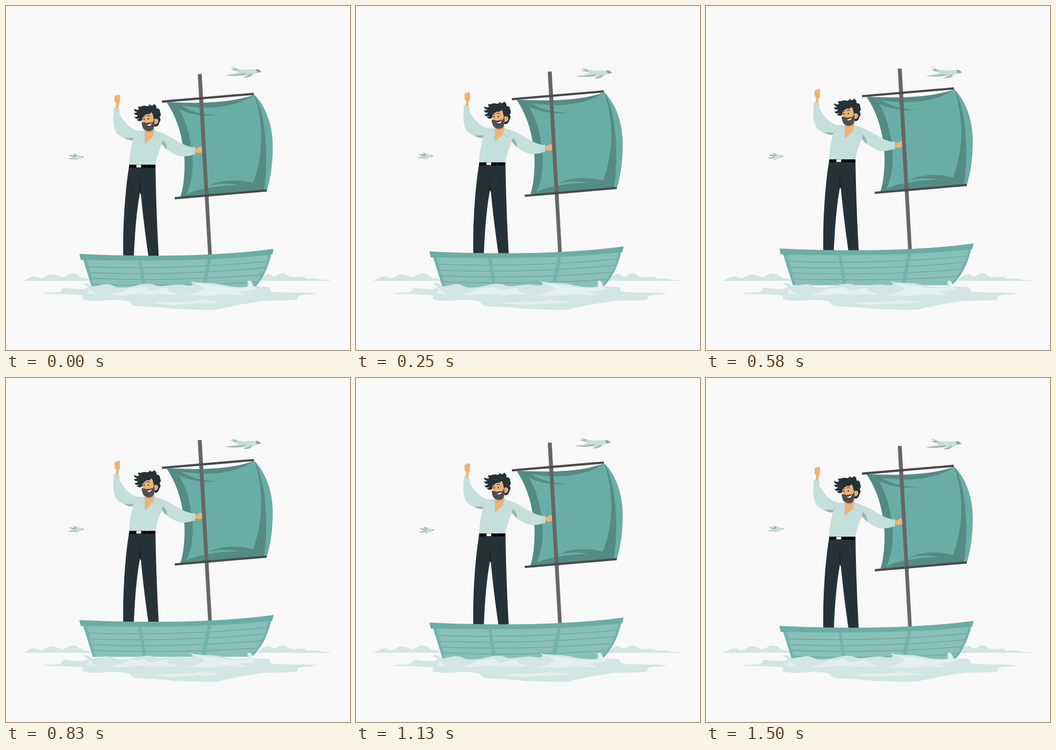
An HTML page that plays this animation: 748x748 px, repeating every 1540 ms.

```html
<!DOCTYPE html>
<html lang="en">
<head>
<meta charset="utf-8">
<title>Sailing</title>
<style>
html, body { margin: 0; width: 100%; height: 100%; overflow: hidden; background: #f8f8f8; }
svg { display: block; width: 100%; height: 100%; }
.teal { fill: #6aada7; }
.deep { fill: #558b85; }
.hull { fill: #88bfb9; }
.rib { fill: #74b3ac; }
.sea { fill: #d2e6e3; }
.foam { fill: #e4f0ee; }
.cloth { fill: #c5dfdb; }
.shade { fill: #9db3b0; }
.skin { fill: #efb274; }
.ink { fill: #263238; }
.plank { fill: none; stroke: #6a9f99; stroke-width: 1.3; }
.seam { fill: none; stroke: #a9c9c5; stroke-width: .7; }
.yard { stroke: #4a4a4a; stroke-width: 4.8; }
.tie { fill: none; stroke: #263238; stroke-width: 1.2; }
</style>
</head>
<body>
<svg viewBox="0 0 748 748">
  <rect width="748" height="748" fill="#f8f8f8"/>

  <!-- far waves -->
  <g class="sea" stroke="#bfdad6" stroke-width=".5">
    <path d="M38 597C45 596 50 590 58 589C70 588 70 593 78 592C88 590 90 584 100 584C110 584 115 589 122 590C130 590 135 582 145 582C158 582 160 592 170 592C175 592 180 595 186 597Z"/>
    <path d="M545 597C555 592 562 582 572 583C580 590 585 590 592 585C600 580 606 581 612 586C620 592 625 590 634 590C645 588 650 590 655 594C665 593 672 592 680 594C690 597 700 596 706 597Z"/>
  </g>

  <!-- birds -->
  <g id="bird">
    <path class="shade" d="M488 131.500L507 137.500L524 140L514 144L500 141L487 137L498 137Z"/>
    <path class="cloth" d="M498 137L512 138L526 139L516 143L504 141Z"/>
    <path class="cloth" d="M514 140.500C525 136 538 139 545 137.500C551 137 552 141 556 143C550 145 545 146 541 147C536 153 526 156 516 155C521 153 519 151 520 149C505 151 490 154 478 150C492 147.500 500 147 514 140.500Z"/>
    <path class="shade" d="M478 150C492 150 506 149 520 146L519 150C505 152 490 153 478 150ZM516 155C525 153 530 149 535 146L533 152C528 155 522 156 516 155Z"/>
    <path fill="#86aaa6" d="M543 138C551 136 552 141 556 143L546 145Z"/>
  </g>
  <g id="chick">
    <path class="shade" d="M146 321L157 324L160 328L150 328ZM136 324L147 325L153 329L143 328Z"/>
    <path class="cloth" d="M151 323L160 325L162 328L154 328ZM134 331C143 331 148 328 155 327C160 325 164 325 166 327L170 328C166 330 163 331 160 332C157 335 152 336 147 335L150 332C144 334 138 334 134 331Z"/>
    <path class="shade" d="M134 331C141 332 146 331 151 330L150 332C144 334 138 333 134 331ZM164 326L170 328L165 330Z"/>
  </g>

  <g id="boat">
    <!-- sail -->
    <path class="teal" d="M349 209C395 211 480 215 540 193C563 215 580 257 580 305C580 345 575 375 567 402L379 416C386 396 388.500 368 388.500 340C386 287 372 242 349 209Z"/>
    <path class="deep" d="M349 209C395 211 480 215 540 193C515 210 480 221 430 221C395 220 370 215 352 209Z"/>
    <path class="deep" d="M352 209C384 234 420 241 464 237C425 237 400 229 376 213Z"/>
    <path class="deep" d="M349 209C372 242 386 287 388.500 340C388.500 368 386 396 379 416L390 415C402 392 407 362 406 335C403 290 393 248 372 218Z"/>
    <path class="deep" d="M540 193C566 235 571 330 561 402L384 414C400 404 420 398 440 396C465 391 490 389 508 390C480 384 455 387 440 391C470 376 510 377 537 385C560 325 561 255 540 193Z"/>
    <path class="yard" d="M339 208L539 191M367 418L567 401"/>

    <!-- outstretched arm -->
    <path class="skin" d="M409 310L417 309L420 306L428 306L428 318L419 320L409 318Z"/>
    <path fill="#666" d="M417 148L425.500 147.500L447.500 541L439.500 541Z"/>
    <path class="tie" d="M420 198L429 204M420 204L429 198M432 409L441 415M432 415L441 409"/>
    <path class="cloth" d="M328 273C346 275 364 290 382 299C392 304 402 307 410 308L410 322C395 328 380 329 368 323C354 317 345 307 336 298Z"/>
    <path class="shade" d="M339 289C343 294 351 299 350 312C344 307 340 301 336 298Z"/>
    <path class="cloth" stroke="#a9c9c5" stroke-width=".6" d="M407 307L411 307L411 323L407 323Z"/>

    <!-- raised arm -->
    <path class="skin" d="M238 224L239.500 212L236 208L236 196L246 192L248 196L247.500 210L245 213L244 224Z"/>
    <path class="cloth" d="M235 225C232 245 233 265 240 276C252 288 266 292 277 291L293 271C276 272 261 259 247 235L246 225Z"/>
    <path class="shade" d="M257 287C264 288 270 285 277 287L276 292C268 293 262 290 257 287Z"/>
    <path class="cloth" stroke="#a9c9c5" stroke-width=".6" d="M234 224L236 221L246 224L246 229Z"/>

    <!-- legs and belt -->
    <path class="ink" d="M267.500 350C259 400 254 478 255 543L278 543C280.500 485 285 436 292.500 400C297 450 302 490 309.500 543L332 543C328 470 326 410 325 350Z"/>
    <path fill="#1a2328" d="M291 376L294 410L289 403Z"/>
    <path d="M268 345H325V351.500H267.500Z"/>
    <path fill="#fff" d="M283.500 345.500H294V351H283.500Z"/>
    <path stroke="#4b5357" stroke-width=".8" d="M276.500 345V351M306 345V351"/>

    <!-- shirt -->
    <path class="cloth" d="M268 345C268 322 273 306 276 291C275 283 281 273 293 271L323 271C335 274 341 279 342 286C339 305 327 325 325 345Z"/>
    <path class="skin" d="M303 264L322 260L323 274C320 285 311 291 303 299C300 291 301 282 302 274Z"/>
    <path fill="#d99a5b" d="M305 270C313 273 319 270 322 264L322 268C317 275 310 276 304 273Z"/>
    <path class="cloth" stroke="#a9c9c5" stroke-width=".7" d="M302 272L295 275L303 300C303 292 301 282 302 272ZM323 271L337 284L328 290L319 280Z"/>
    <path class="seam" d="M303 299L318 287L322 276M277 290L281 281"/>

    <!-- head -->
    <path class="ink" d="M297 247C294 252 288 251 284 247C287 247 289 246 290 244C285 247 281 245 279 241C283 242 286 240 287 237C283 238 279 236 278 232C281 233 284 232 285 230C280 230 278 227 279 223C282 226 286 227 290 224C287 223 287 220 288 218C292 221 297 216 303 217C307 218 311 219 312 213C315 217 319 218 322 213C327 216 328 220 327 223C332 222 336 226 335 231C338 236 336 239 334 242C338 247 335 251 333 254C332 260 328 263 323 262L315 238Z"/>
    <path class="skin" d="M297 241C302 238 306 234 309 235C313 236 314 233 316 231C321 236 320 243 322 247C324 244 330 244 331 249C331 255 327 258 323 257C321 266 314 271 307 270C299 269 296 261 296 254Z"/>
    <path fill="#4b5054" d="M295 252C299 254 301 252 304 254C309 255 315 252 319 253C321 250 321 247 322 246C324 253 324 264 318 270C312 274 303 272 299 267C296 262 295 257 295 252Z"/>
    <path fill="#8d2f35" d="M306 259C311 258 314 257 317 254C317 259 313 263 309 262.500Z"/>
    <path fill="#fff" d="M306 259C311 258 314 257 317 254L315 259C313 260.500 309 261 306 259Z"/>
    <g class="ink"><ellipse cx="300" cy="246" rx="1.300" ry="1.800"/><ellipse cx="309.500" cy="245.500" rx="1.300" ry="1.800"/></g>
    <path fill="none" stroke="#263238" stroke-width="1.200" d="M297 242L302 240M306 239.500Q310 237 313 240"/>
    <path fill="none" stroke="#c98a4c" stroke-width=".8" d="M304 244L301.500 251L304 251.500M326 248Q329 249 326 254"/>

    <!-- hull -->
    <path class="hull" d="M167 549L189 619H534C556 600 570 570 577 538Z"/>
    <path class="plank" d="M178 567C290 571 430 569 571 555M181 580C290 584 430 582 564 569M185 592C290 597 430 595 556 584M188 605C290 609 430 608 544 600"/>
    <path class="rib" d="M167 549H175L194 619H189ZM288 552H294L305 619H298ZM439 550H446L433 619H424ZM577 538C570 570 556 600 534 619H528C551 599 565 570 571 538Z"/>
    <path class="teal" d="M159.500 539C290 545 450 546 582 528L579 540.500C440 556 300 554 162.500 552Z"/>
  </g>

  <!-- near water -->
  <path class="sea" d="M83 624L100 623C115 623 118 622 120 620C126 617 121 615 123 614C130 611 140 616 150 615C160 617 172 615 178 612C176 608 168 606 168 604C172 601 180 604 186 609C195 611 205 605 218 605C235 605 232 612 248 612C275 613 285 605 305 604C325 603 320 609 338 609C360 607 375 604 390 607C400 609 407 607 406 604C405 601 402 600 400 598C418 604 445 600 465 605C480 609 500 612 522 611C530 608 522 600 526 598C533 594 537 604 536 608C545 612 565 609 572 612C578 616 570 619 580 621C610 624 640 622 675 624C670 629 650 626 637 630C632 634 636 638 630 639C600 642 570 639 555 642C530 646 500 650 490 654C470 656 470 658 462 660C430 662 400 659 370 659C345 656 320 654 290 653C275 652 272 649 272 646C270 640 240 638 215 640C200 642 170 641 167 637C165 632 172 632 165 629C140 626 110 627 83 626Z"/>
  <g class="foam">
    <path d="M225 627C240 625 255 622 262 616C268 611 280 616 290 612C310 606 300 620 320 618C340 615 345 612 352 612C345 620 365 624 372 625C370 631 345 626 325 627C305 630 300 624 280 626C260 630 240 630 225 627Z"/>
    <path d="M388 629C415 626 420 620 432 616C430 610 415 604 402 599C425 607 450 605 480 612C500 614 515 613 526 612C533 608 524 600 528 598C540 604 535 612 545 615C530 619 520 620 505 620C515 625 525 627 520 628C500 632 490 624 470 627C450 631 430 630 388 629Z"/>
    <path d="M179 612C186 617 190 624 199 628C190 628 184 625 177 626C175 622 183 619 179 612Z"/>
    <path d="M318 646C350 640 400 646 415 640C430 636 430 642 470 643C450 648 400 647 390 648C360 652 340 648 318 646Z"/>
  </g>
</svg>
<script>
const LOOP = 1540, FPS = 24, LAST = 36;
const [boat, bird, chick] = ["boat", "bird", "chick"].map(id => document.getElementById(id));

// boat lift: [step, height, slope]
const lift = [
  [0, 0, 0.9], [6, 5.3, 0.88], [14, 11.8, 0.6], [18, 13, 0],
  [20, 12.7, -0.35], [27, 7.2, -0.9], [32, 2.7, -0.82], [36, 0, -0.5]
];

function hermite(keys, x) {
  const i = Math.max(1, keys.findIndex(k => k[0] >= x));
  const [x0, y0, m0] = keys[i - 1], [x1, y1, m1] = keys[i];
  const d = x1 - x0, u = (x - x0) / d, v = 1 - u;
  return v * v * ((1 + 2 * u) * y0 + u * d * m0) + u * u * ((1 + 2 * v) * y1 - v * d * m1);
}

const move = (el, x, y) => el.setAttribute("transform", `translate(${x.toFixed(2)} ${y.toFixed(2)})`);

function draw(ms) {
  const step = Math.min(LAST, Math.floor((ms % LOOP) * FPS / 1000 + 0.12));
  const sway = Math.sin(step / LAST * 2 * Math.PI);
  move(boat, 0, -hermite(lift, step));
  move(bird, 1.6 * sway, 2.5 * sway);
  move(chick, -1.4 * sway, -2.5 * sway);
}

const start = performance.now();
function tick() {
  draw(performance.now() - start);
  requestAnimationFrame(tick);
}
tick();
</script>
</body>
</html>
```
